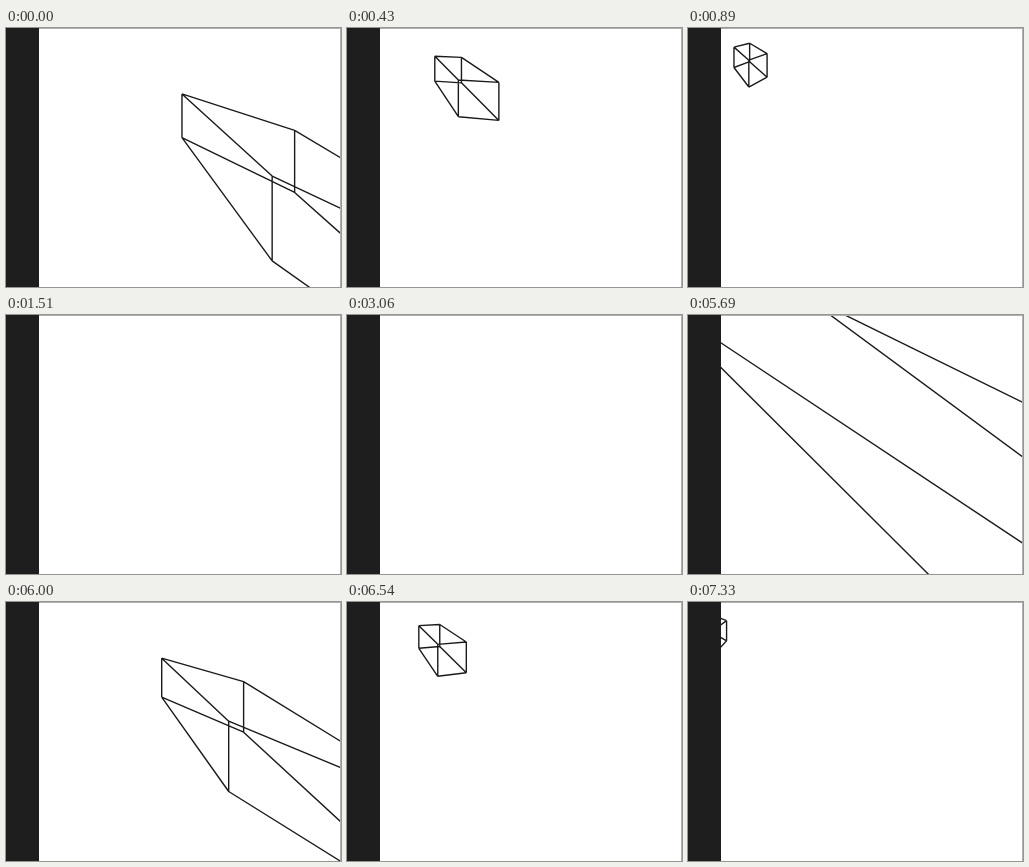
Write an HTML page with a canvas that moves like this. It is 335 px wide and 259 px high and loops after 7400 ms.

```html
<!DOCTYPE html>
<html lang="en">
<head>
<meta charset="utf-8">
<title>Rotating wireframe cube</title>
<style>
  html, body { margin: 0; width: 100%; height: 100%; overflow: hidden; background: #fff; }
  canvas { display: block; }
</style>
</head>
<body>
<canvas id="stage" width="335" height="259"></canvas>
<script>
const ctx = document.getElementById('stage').getContext('2d');
const W = 335, H = 259, LOOP = 7400;
const LEFT = 33, TOP = -21.6;      // projection origin on the stage
const FOCAL = 77.2, DEPTH = 0.24;
const LAST_STEP = 95;

// The cube turns in discrete steps: [step, yaw in degrees]
const turn = [[0, 31.3], [19, -55.5], [35, -131.2], [39, -149.8], [71, -300], [95, -411.9]];

function stepAt(t) {
  const step = t < 430 ? t / 71.6 : 6 + (t - 424) / 77.4;
  return Math.min(LAST_STEP, Math.floor(step));
}

function yawAt(step) {
  const i = Math.max(1, turn.findIndex(([s]) => s >= step));
  const [s0, a0] = turn[i - 1], [s1, a1] = turn[i];
  return (a0 + (a1 - a0) * (step - s0) / (s1 - s0)) * Math.PI / 180;
}

// Corners of the cube from 2 to 3 on each axis, one bit per axis
function project(corner, yaw) {
  const x = 2 + (corner & 1), y = 2 + (corner >> 1 & 1), z = 2 + (corner >> 2);
  const c = Math.cos(yaw), s = Math.sin(yaw);
  const scale = FOCAL / (z * c - x * s + DEPTH);
  return [LEFT + (x * c + z * s) * scale, TOP + y * scale];
}

function draw(t) {
  const yaw = yawAt(stepAt(t));
  ctx.fillStyle = '#fff';
  ctx.fillRect(0, 0, W, H);

  ctx.beginPath();
  for (let a = 0; a < 8; a++) {
    for (const bit of [1, 2, 4]) {
      if (a & bit) continue;
      ctx.moveTo(...project(a, yaw));
      ctx.lineTo(...project(a | bit, yaw));
    }
  }
  ctx.strokeStyle = '#1a1a1a';
  ctx.lineWidth = 1.4;
  ctx.lineJoin = 'round';
  ctx.stroke();

  ctx.fillStyle = '#b0b0b0';
  ctx.fillRect(LEFT, 0, W - LEFT, 1);
  ctx.fillRect(W - 1, 0, 1, H);
  ctx.fillStyle = '#1e1e1e';
  ctx.fillRect(0, 0, LEFT, H);
}

const start = performance.now();
function tick() {
  draw((performance.now() - start) % LOOP);
  requestAnimationFrame(tick);
}
tick();
</script>
</body>
</html>
```
